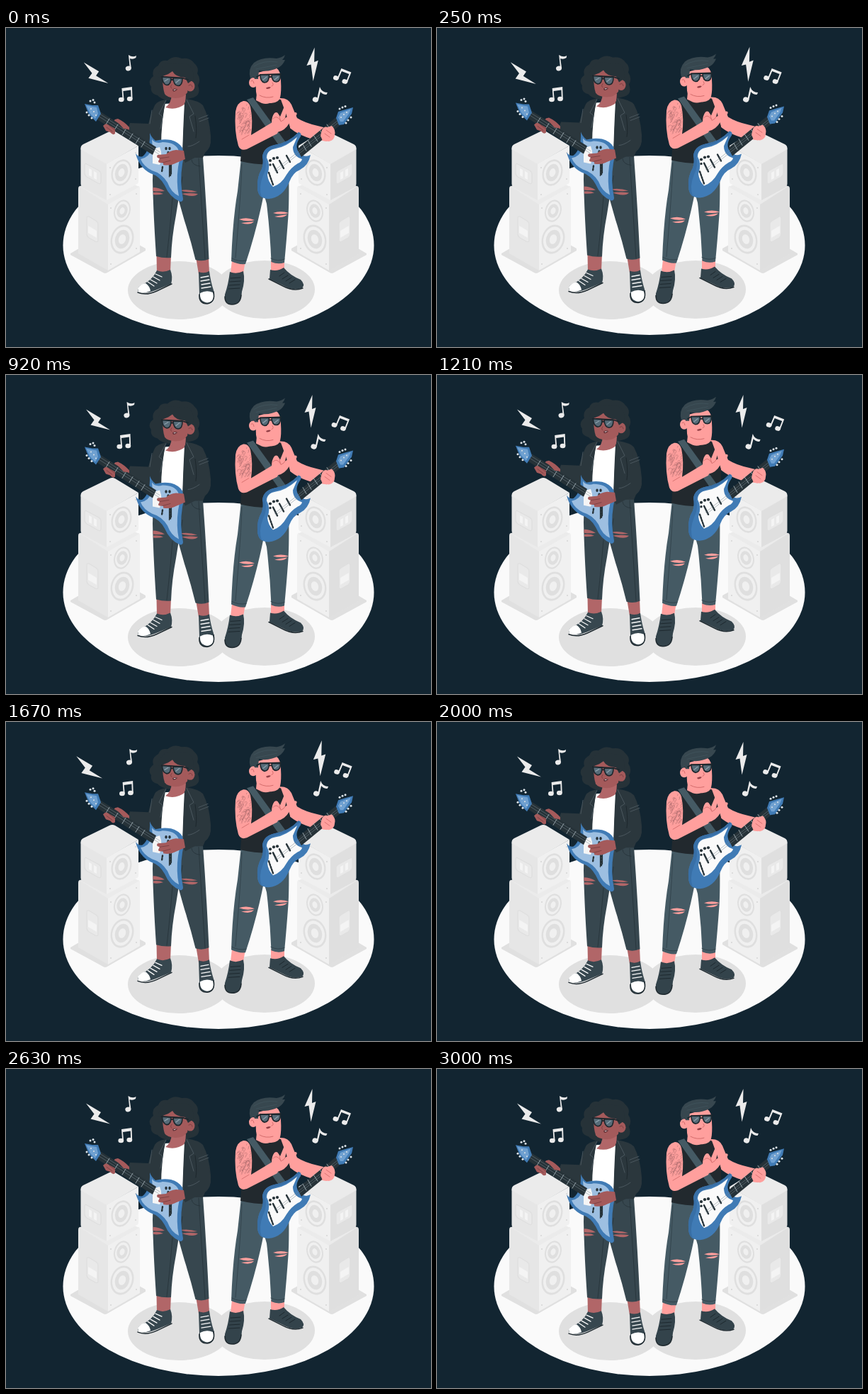
These frames come from a looping animation (600 by 450 pixels, 3040 ms). An HTML page:

```html
<!DOCTYPE html>
<html lang="en">
<head>
<meta charset="utf-8">
<title>Guitar duo</title>
<style>
html, body { margin: 0; width: 100%; height: 100%; overflow: hidden; background: #122531; }
svg { display: block; width: 600px; height: 450px; }
.line { fill: none; stroke-linecap: round; stroke-linejoin: round; }
.skinA { fill: #b16668; }
.faceA { fill: #a45a5b; }
.skinB { fill: #ff9f9d; }
.ink { fill: #263238; }
.jacket { fill: #2b373d; }
.denimA { fill: #37474f; }
.denimB { fill: #455a64; }
.blue { fill: #407bb5; }
.pale { fill: #ebebeb; }
.lens { fill: #566b78; stroke: #1d272d; stroke-width: 1.6; }
</style>
</head>
<body>
<svg viewBox="0 0 600 450">
  <defs>
    <g id="stack">
      <path fill="#e0e0e0" d="M91 318 103 311 144 330 188 306 197 311V314L143 345Q140 347 137 345L91 320Z"/>
      <path fill="var(--side)" d="M102 227Q102 222 107 223L144 246V342L102 318Z"/>
      <path fill="#f0f0f0" d="M144 247 185 223Q189 222 189 227V316L144 342Z"/>
      <path fill="#ebebeb" d="M105 224 144 203 188 224 144 249Z"/>
      <path fill="var(--side)" d="M105.500 170 142 190V243L108 225Q105.500 223 105.500 220Z"/>
      <path fill="#f0f0f0" d="M142 191 187 166V216Q187 219 185 220L142 243Z"/>
      <path fill="#ebebeb" d="M105.500 171Q105 166 109 164L146 146Q150 144 154 146L187 166 142 192Z"/>
      <g fill="#e9e9e9" stroke="#dedede" stroke-width="1.2">
        <path d="M114 192 131 201Q134 203 134 206V217Q134 221 130 219L114 210Q111 208 111 205V194Q111 190 114 192Z"/>
        <path d="M117 266 127 272Q130 274 130 277V299Q130 303 126 301L117 296Q114 294 114 290V269Q114 265 117 266Z"/>
      </g>
      <path fill="#f4f4f4" d="M117 198 121 200V210L117 208ZM124 202 128 204V214L124 212ZM116 279 128 286V296L116 289Z"/>
      <g fill="#dfdfdf">
        <g transform="translate(163 204) rotate(17)"><ellipse rx="14" ry="19"/><ellipse rx="11.7" ry="16.4" fill="#f0f0f0"/><ellipse rx="8.8" ry="12.5"/><ellipse rx="4.2" ry="6.2" fill="#f0f0f0"/></g>
        <g transform="translate(164 258) rotate(17)"><ellipse rx="11.5" ry="16"/><ellipse rx="9.6" ry="13.7" fill="#f0f0f0"/><ellipse rx="7.4" ry="10"/><ellipse rx="3.4" ry="5" fill="#f0f0f0"/></g>
        <g transform="translate(164 298) rotate(17)"><ellipse rx="16" ry="21"/><ellipse rx="13.5" ry="18" fill="#f0f0f0"/><ellipse rx="10" ry="13.5"/><ellipse rx="5" ry="7" fill="#f0f0f0"/></g>
      </g>
      <g fill="#d6d6d6">
        <circle cx="147" cy="197" r="1"/><circle cx="183" cy="176" r="1"/><circle cx="147" cy="235" r="1"/><circle cx="183" cy="213" r="1"/>
        <circle cx="148" cy="254" r="1"/><circle cx="184" cy="234" r="1"/><circle cx="148" cy="333" r="1"/><circle cx="184" cy="311" r="1"/>
      </g>
    </g>
  </defs>

  <rect width="600" height="450" fill="#122531"/>
  <ellipse cx="300" cy="306.5" rx="219.5" ry="126.5" fill="#fafafa"/>
  <g fill="#e0e0e0">
    <ellipse cx="244" cy="370" rx="72" ry="41"/>
    <ellipse cx="365" cy="369" rx="71" ry="41"/>
  </g>
  <use href="#stack" style="--side:#e6e6e6"/>
  <use href="#stack" style="--side:#dfdfdf" transform="matrix(-1 0 0 1 600 0)"/>

  <g id="bolts" class="pale">
    <path d="M113 48.500 134 61 130 67 147 77.500 119.500 70.500 124.500 63.500Z"/>
    <path d="M432.500 28 421.500 53 427.500 51.500 430.500 74.500 437.500 46 432 48Z"/>
  </g>

  <g id="notes" class="pale">
    <ellipse cx="172.800" cy="57" rx="4" ry="3.400" transform="rotate(-20 172.800 57)"/>
    <path d="M173 38Q179 42 184 39L183.500 42Q179 45 175 43L177 57H175Z"/>
    <ellipse cx="162.800" cy="101" rx="3.900" ry="3.300"/>
    <ellipse cx="174.800" cy="100" rx="3.900" ry="3.300"/>
    <path d="M163.500 85 178 83 178.600 100H176.700L176.300 87.500 165.500 89 166.600 101H164.700Z"/>
    <ellipse cx="466" cy="70.500" rx="4" ry="3.300" transform="rotate(20 466 70.500)"/>
    <ellipse cx="478.500" cy="75.500" rx="4" ry="3.300" transform="rotate(20 478.500 75.500)"/>
    <path d="M473.500 57 487.500 62.500 482.200 76 480.500 75 484.500 65 474 61 469.500 71.500 467.800 70.500Z"/>
    <ellipse cx="437" cy="101" rx="4.200" ry="3.500" transform="rotate(15 437 101)"/>
    <path d="M443 83Q446 91 454 91L452.500 94Q447 94 444 90L441 102 439 101Z"/>
  </g>

  <g id="band">
    <!-- left player -->
    <g>
      <path class="skinA" d="M212.500 320H233L232 344 213 345ZM268 323H286L287 346 272 347Z"/>
      <path class="denimA" d="M208 182H278Q283 250 286.500 326Q277 330 267.500 327Q261 300 252 272L243.500 242 240 264Q234 295 233 324Q222 325 212 322Q208 262 207 215Z"/>
      <g class="line" stroke="#28353c" stroke-width=".9">
        <path d="M272 184Q276 250 281 326M235 240Q232 280 227 323M243 241Q248 222 249 210M262 186Q263 194 274 195"/>
      </g>
      <g class="skinA">
        <path d="M207.500 225Q216 225 224 230Q216 231 207.500 230ZM208 232Q217 231 222 234Q215 236 208 235Z"/>
        <path d="M246 229Q258 227 270 231Q258 233 246 229ZM248 234Q260 232 271 234Q266 240 248 234Z"/>
      </g>

      <path class="denimA" d="M213 342Q222 346 232 341Q236 351 233 361L211 370Q196 376 187 372Q184 367 190 363Q206 357 213 342Z"/>
      <path fill="#fff" d="M186 367Q190 361 197 360Q203 364 204 371Q194 375 187 373Z"/>
      <path class="line" stroke="#1f2a30" stroke-width="1.500" d="M186 373Q198 378 213 371L234 361"/>
      <path class="line" stroke="#fafafa" stroke-width="1.300" d="M200 358 209 364M204 355 213 360M208 351 217 356M211 347 220 351"/>
      <path class="denimA" d="M272 344Q280 347 287 343Q289 358 293 370Q297 388 284 389Q272 389 273 375Z"/>
      <path fill="#fff" d="M274 374Q283 369 292 373Q296 386 284 387.500Q273 386 274 374Z"/>
      <path class="line" stroke="#1f2a30" stroke-width="1.500" d="M273 376Q272 389 284 389Q296 387 293 372"/>
      <path class="line" stroke="#fafafa" stroke-width="1.300" d="M275 352 286 350M275 357 287 355M276 362 288 360M276 367 289 365"/>

      <path fill="#fff" d="M224 107 253 105Q250 150 249 190H216Q217 150 224 107Z"/>
      <path class="ink" d="M214 95Q203 92 205 83Q199 75 208 68Q205 58 215 53Q218 44 228 46Q237 38 248 43Q260 41 266 50Q273 56 270 64Q276 73 271 81Q276 94 265 98L245 103Q222 104 214 95Z"/>
      <path class="skinA" d="M234 94H254L253 107Q240 117 225 112Q233 107 234 94Z"/>
      <path class="faceA" d="M221 68Q228 64 235 60L257 70Q259 77 256 91Q251 99 239 99Q227 98 224 93Q221 84 221 68Z"/>
      <ellipse class="faceA" cx="260" cy="82" rx="6.500" ry="7.500"/>
      <path class="ink" d="M214 70Q222 68 229 65L235 61Q239 69 253 70L257 78 264 73Q267 57 256 51L226 50Q215 59 214 70Z"/>
      <path class="line" stroke="#7a3d40" stroke-width=".9" d="M258 81Q262 78 263 83M234 80Q231 84 234 85"/>
      <path fill="#602f35" d="M235 87Q239 84.500 242 86.500Q240 89.500 236 89.500Z"/>
      <path fill="#fff" d="M236.500 87 241 86.500 237.500 88Z"/>
      <path class="line" stroke="#1d272d" stroke-width="1.800" d="M220 69 249 70.500 257 73M233 73H236"/>
      <path class="lens" d="M220.500 69 233 70Q233 80.500 227 80.500Q220.500 79 220.500 69ZM236 70.500 249 71Q249 81.500 243 81.500Q236.500 81 236 70.500Z"/>
      <path class="line" stroke="#8ca0ab" stroke-width="1.300" d="M224 75 229 72M240 77 245 73"/>

      <path class="jacket" d="M226 101Q213 103 210 109Q205 120 201 135L175 134Q171 142 176 152L219 168Q219 130 226 101Z"/>
      <path class="jacket" d="M255 100Q273 103 278 109Q287 126 289 152Q290 169 281 176L278 183H249Q250 140 252 106Z"/>
      <path class="jacket" d="M278 110Q289 145 289 161Q288 173 276 178L253 190 247 180 256 165Q264 158 270 153Z"/>
      <g class="line" stroke="#536067" stroke-width=".8">
        <path d="M226 102 216 121 221 125 218 142M255 101 265 121 259 125 265 146M272 128 285 123M273 132 286 127M257 167Q263 167 273 160M206 116 203 135"/>
      </g>
      <path class="line" stroke="#1d272c" stroke-width="1" d="M267 124Q270 143 268 155"/>

      <path class="faceA" d="M174 140Q167 132 158 128Q150 129 154 133L163 139Q153 142 158 146L174 151Z"/>

      <path class="blue" d="M203 148Q205 154 211 159Q222 156 233 158Q244 161 249 169Q252 180 249 192Q245 216 250 241Q250 245 246 245Q231 239 224 222Q217 209 204 205Q188 197 183 177Q188 183 193 181Q204 172 203 148Z"/>
      <path fill="#9dbfe1" d="M206 157Q211 164 221 161Q238 161 243 171Q247 180 243 196Q240 218 244 237Q233 232 228 218Q220 205 206 201Q194 195 190 185Q202 183 206 170Q207 163 206 157Z"/>
      <path fill="#f5f5f5" d="M207 171 217 168Q222 181 217 193L207 191Z"/>
      <path class="line" stroke="#263238" stroke-width="2.400" d="M221 196 220 203M232 194V209" stroke-dasharray="2 2"/>
      <path class="line" stroke="#263238" stroke-width="1.200" d="M230.500 188V210M233.500 192V206"/>
      <g class="ink"><ellipse cx="226" cy="170" rx="1.700" ry="2.300"/><ellipse cx="231" cy="170" rx="1.700" ry="2.300"/><ellipse cx="229" cy="176" rx="1.700" ry="2.300"/></g>
      <path class="ink" d="M133 118 212 168 207 179 127 128Z"/>
      <path class="line" stroke="#78868e" stroke-width=".5" d="M130 124 216 178M132 121 217 175"/>
      <path class="line" stroke="#b0bec5" stroke-width=".8" d="M146 128 141 136M158 136 153 144M169 143 164 151M179 149 174 157M188 155 183 163M196 160 191 168"/>
      <path class="blue" d="M111 107 122 109 130 109 134 121 127 132 117 122Z"/>
      <path fill="#6fa0d0" d="M113 109 122 111 128 112 130 121 126 128 119 121Z"/>
      <g fill="#dce3e8"><circle cx="119" cy="103" r="1.500"/><circle cx="123" cy="101.500" r="1.500"/><circle cx="125" cy="105" r="1.500"/><circle cx="114" cy="119" r="1.500"/><circle cx="117" cy="123" r="1.500"/><circle cx="121" cy="127" r="1.500"/><circle cx="120" cy="114" r="1"/><circle cx="124" cy="118" r="1"/><circle cx="127" cy="123" r="1"/></g>

      <path class="faceA" d="M137 138Q141 133 145 137L154 142V149Q151 152 147 147L141 145ZM154 129Q162 129 168 135L174 143 166 142Z"/>
      <path class="line" stroke="#733b3f" stroke-width=".8" d="M142 140 150 146M146 138 154 144"/>
      <path class="faceA" d="M251 173 240 172Q231 173 226 178L214 179Q211 183 217 184L215 188Q215 191 222 190L222 193Q232 195 241 190L253 185Z"/>
      <path class="line" stroke="#733b3f" stroke-width=".8" d="M217 184 230 182M221 190 232 187"/>
    </g>

    <!-- right player -->
    <g>
      <path class="skinB" d="M319 328H338L335 346 317 346ZM374 328H393L393 344 374 344Z"/>
      <path class="denimB" d="M332 184 399 188Q400 240 398.500 265Q396 300 393 331Q384 334 374.500 330Q373 290 368 248L364 234Q354 285 338 333Q328 334 318 329Q320 270 327 230Z"/>
      <path class="line" stroke="#33444d" stroke-width="1" d="M319 325Q328 330 339 328M374 325Q384 330 393 326M365 236Q371 222 370 210M333 192Q332 230 324 324"/>
      <g class="skinB">
        <path d="M329 270Q340 266 351 271Q340 274 329 270ZM332 275Q342 274 350 273Q345 279 332 275Z"/>
        <path d="M377 261Q388 257 399 261Q388 264 377 261ZM379 266Q389 264 397 263Q392 269 379 266Z"/>
      </g>
      <path fill="#33434b" d="M316 344Q325 348 335 343Q338 356 333 372Q332 390 319 390Q308 389 309 376Q314 361 316 344Z"/>
      <path fill="#33434b" d="M373 341Q383 344 392 338Q401 349 416 355Q423 362 418 367Q405 371 391 363L372 354Z"/>
      <path class="line" stroke="#202b31" stroke-width="1.500" d="M309 379Q309 390 319 390Q331 390 332 377M371 354 391 364Q406 372 419 367"/>
      <path class="line" stroke="#1d282e" stroke-width="1" d="M317 353 331 352M316 358 331 357M315 363 330 362M314 368 330 367M386 350 393 345M390 354 398 349M395 357 403 352M400 360 408 355"/>

      <path class="skinB" d="M386 99Q398 98 403 108Q407 118 411 127Q422 134 440 138L456 142 453 160 430 156Q402 147 393 132Z"/>
      <path fill="#22292e" d="M345 105 357 101 388 101Q396 121 401 140V190Q365 196 331 188Q334 150 335 115Z"/>
      <path class="denimB" d="M340 101 349 98 397 164 389 171Z"/>
      <path class="skinB" d="M354 92H379L377 103Q370 109 361 106L353 102Z"/>
      <path class="skinB" d="M352 64 381 56Q388 60 388 74Q389 90 387 98Q385 106 371 106Q355 105 353 90Z"/>
      <ellipse class="skinB" cx="349" cy="77" rx="6" ry="7"/>
      <path fill="#37474f" d="M345 71Q341 58 350 49Q362 40 382 43Q389 42 394 38Q393 42 390 45L394 45Q391 52 386 55Q372 63 357 60L356 72H351L350 69Z"/>
      <path class="line" stroke="#43565f" stroke-width=".7" d="M350 54Q364 45 383 48M353 58Q367 55 382 52"/>
      <path class="line" stroke="#cf6767" stroke-width=".9" d="M346 75Q349 72 350 78M376 77Q379 81 375 82M358 95Q367 100 377 97"/>
      <path fill="#913e45" d="M367 84.500Q371 82 374 83.500Q372 86.500 368 86Z"/>
      <path class="line" stroke="#1d272d" stroke-width="1.800" d="M354 69 359 66 388 65M371 69H375"/>
      <path class="lens" d="M359 66 371.500 66Q371.500 77 365 77Q359 76 359 66ZM375 66H387.500Q387.500 76 381.500 76Q375.500 76 375 66Z"/>
      <path class="line" stroke="#8ca0ab" stroke-width="1.300" d="M363 73 368 69M379 73 384 69"/>

      <path class="skinB" d="M335 103Q326 105 324 118Q322 145 328 166Q331 174 340 171L383 149 389 134 376 133 346 151Q349 130 345 111Q342 102 335 103Z"/>
      <clipPath id="arm"><path d="M335 104Q325 106 324 121Q324 140 328 152L346 148Q348 127 344 110Z"/></clipPath>
      <path id="tattoo" class="line" clip-path="url(#arm)" stroke="#a8696b" stroke-width=".5"/>
      <path class="skinB" d="M375 134Q375 125 379 120Q383 117 385 122L387 125 394 108Q398 105 398 110L394 127 408 119Q412 119 410 123L400 134Q394 145 383 147Z"/>
      <path class="line" stroke="#cf6767" stroke-width=".8" d="M377 128Q382 122 387 130M386 125 388 132Q393 130 394 127M343 151 333 157"/>

      <path class="blue" d="M413 147Q418 148 416 153Q406 167 414 175Q421 184 430 179Q427 194 415 200Q405 204 400 217Q391 239 371 241Q356 241 355 226Q354 210 361 199Q364 190 362 181Q364 168 379 165Q399 162 413 147Z"/>
      <path fill="#386fa6" d="M413 147Q399 162 379 165Q364 168 362 181Q364 190 361 199Q354 210 355 226Q356 236 361 239Q356 225 363 208Q369 196 366 184Q368 172 382 168Q402 163 415 149Z"/>
      <path fill="#fafafa" d="M411 154Q395 168 381 170Q368 172 368 183Q374 193 369 207Q370 217 377 224Q389 220 396 207Q402 197 412 191Q417 189 418 185Q405 181 405 168Z"/>
      <path class="line" stroke="#263238" stroke-width="2.400" d="M377 192 383 204M386 187 392 198M396 180 401 189"/>
      <path class="line" stroke="#263238" stroke-width="2.400" stroke-dasharray="2 2" d="M371 204 377 221"/>
      <g class="ink"><circle cx="373" cy="187" r="2.100"/><circle cx="378" cy="184" r="2.100"/><circle cx="383" cy="183" r="2.100"/><circle cx="373" cy="193" r="1.700"/></g>
      <path class="ink" d="M466 126 473 136 417 182 411 171Z"/>
      <path class="line" stroke="#78868e" stroke-width=".5" d="M469 130 379 201M471 132 381 203"/>
      <path class="line" stroke="#b0bec5" stroke-width=".8" d="M453 136 459 145M443 144 449 153M434 151 440 160M426 158 431 167M419 164 424 173"/>
      <path class="blue" d="M490 112 488 121 477 136 470 137 466 127 469 118 479 115Z"/>
      <path fill="#6fa0d0" d="M487 114 484 121 476 132 472 132 469 126 472 120 480 117Z"/>
      <g fill="#dce3e8"><circle cx="471" cy="114" r="1.500"/><circle cx="475" cy="112" r="1.500"/><circle cx="479" cy="110.500" r="1.500"/><circle cx="487" cy="126" r="1.500"/><circle cx="483" cy="130" r="1.500"/><circle cx="480" cy="134" r="1.500"/><circle cx="481" cy="119" r="1"/><circle cx="477" cy="122" r="1"/><circle cx="473" cy="126" r="1"/></g>
      <path class="skinB" d="M446 144Q449 138 454 140L460 138Q466 144 464 151Q464 158 456 160L447 159 444 152Z"/>
      <path class="line" stroke="#cf6767" stroke-width=".8" d="M452 144 459 149M450 149 457 154"/>
    </g>
  </g>
</svg>
<script>
const PERIOD = 3000, LOOP = 3040, LEAD = 30;
const SHAKE = [[0, 0], [.1, -.9], [.2, 1.8], [.3, -3.6], [.4, 3.6], [.5, -3.6], [.6, 3.6], [.7, -3.6], [.8, 1.8], [.9, -.9], [1, 0]];
const BEAT = [[0, 1], [.1, 1.1], [.3, 1], [.4, 1], [.5, 1.1], [.6, 1], [1, 1]];
const FLOAT = [[0, .18], [.5, -8.82], [1, .18]];
const $ = id => document.getElementById(id);
const bolts = $("bolts"), notes = $("notes"), band = $("band");

function tween(keys, p) {
  const i = Math.max(1, keys.findIndex(k => k[0] >= p));
  const [a, from] = keys[i - 1], [b, to] = keys[i];
  return from + (to - from) * (p - a) / (b - a);
}

// Small seeded curls on the upper arm
let seed = 7;
const rand = () => (seed = seed * 16807 % 2147483647) / 2147483647;
let curls = "";
for (let i = 0; i < 30; i++) {
  const r = 1.2 + rand() * 2;
  const x = 324 + rand() * 22, y = 107 + rand() * 42;
  curls += `M${x} ${y}a${r} ${r} 0 1 1 ${r} ${r}q${r} 2 ${r - 3} 3`;
}
$("tattoo").setAttribute("d", curls);

function draw(now) {
  const step = Math.floor((now % LOOP) * .024 + .05);
  const p = Math.min(step / .024 + LEAD, PERIOD) / PERIOD;
  const s = tween(BEAT, p * 2 % 1);
  band.setAttribute("transform", `translate(0 ${tween(FLOAT, p)})`);
  notes.setAttribute("transform", `translate(${tween(SHAKE, p)} 0)`);
  bolts.setAttribute("transform", `translate(275.2 52.8) scale(${s}) translate(-275.2 -52.8)`);
}

const start = performance.now();
function tick() {
  draw(performance.now() - start);
  requestAnimationFrame(tick);
}
tick();
</script>
</body>
</html>
```
